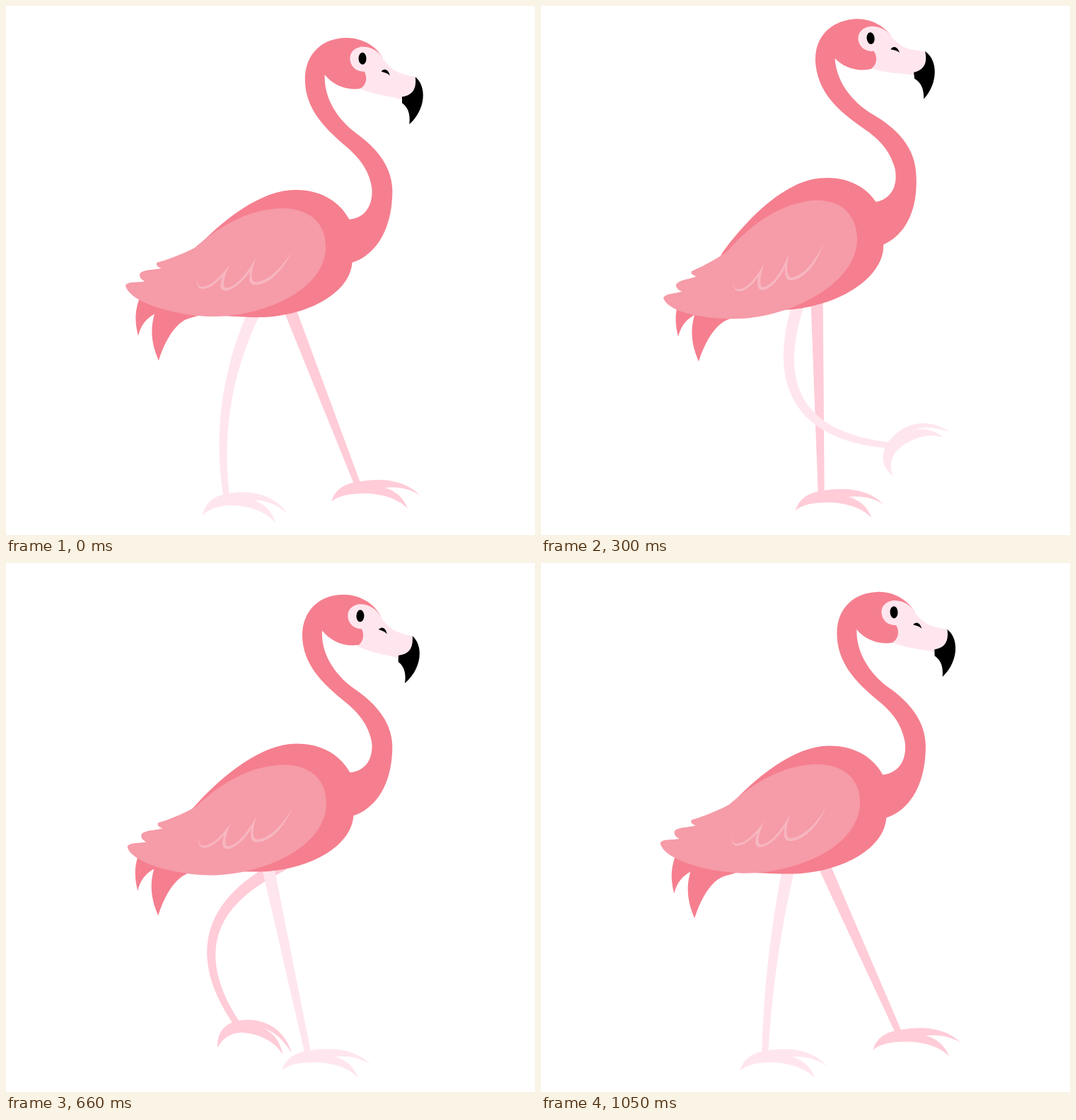
Recreate the animation shown at these times as an HTML page. Size 748x748 px, loop 1080 ms.

```html
<!DOCTYPE html>
<html lang="en">
<head>
<meta charset="utf-8">
<title>Walking flamingo</title>
<style>
  html, body { margin: 0; width: 100%; height: 100%; overflow: hidden; background: #fff; }
  svg { display: block; width: 100vw; height: 100vh; }
  .pink { fill: #f57f8f; }
  .wing { fill: #f69ba8; }
  .mark { fill: #f7b6c0; }
  .pale { fill: #ffe6ee; }
  .rose { fill: #ffccd8; }
</style>
</head>
<body>
<svg viewBox="0 0 748 748">
  <g class="rose"><path id="farLeg"/><path id="farFoot"/></g>
  <g class="pale"><path id="nearLeg"/><path id="nearFoot"/></g>
  <path id="tail" class="pink" d="M188,412 C180,434 182,450 186,466 C190,450 198,441 209,435 C202,460 206,480 215,501 C222,478 238,444 262,440 Q274,436 285,434 L285,415 Z"/>
  <path id="body" class="pink" d="M486,302 C470,272 440,260 410,260 C362,260 308,300 262,350 L222,410 L262,437 C300,436 330,441 365,440 C430,437 487,405 490,363 Z"/>
  <path id="neck" class="pink"/>
  <g id="wing">
    <path class="wing" d="M171,400 C172,393 187,395 198,393 C192,390 190,386 191,382 C196,376 210,377 221,374 C215,372 213,369 215,366 C232,361 252,353 268,344 C308,308 348,287 393,286 C434,287 453,310 453,340 C453,402 365,441 288,441 C242,440 178,424 171,400 Z"/>
    <path class="mark" d="M272,384 C271,395 274,400 280,399 C292,398 305,385 318,367 C310,385 307,398 313,400 C328,400 345,375 355,356 C348,375 347,391 355,391 C372,390 392,370 405,347 C395,371 375,395 354,395 C345,395 345,385 347,375 C338,390 323,404 312,404 C303,404 305,392 308,384 C298,396 286,403 278,402 C271,400 271,392 272,384 Z"/>
  </g>
  <g id="head">
    <path class="pale" d="M534,74 C527,62 514,57 503,58 C493,60 487,67 488,76 C489,87 498,93 508,93 C513,102 510,113 502,117 C520,126 543,128 562,133 C577,127 582,118 580,101 C560,97 548,95 534,74 Z"/>
    <path d="M580,101 C597,115 594,148 571,168 C573,153 569,144 561,138 L561,129 C576,127 582,118 580,101 Z"/>
    <ellipse cx="505.500" cy="74.500" rx="5.500" ry="8.500"/>
    <path d="M532,93 C536,88 542,90 544,99 C540,95 537,95 532,93 Z"/>
  </g>
</svg>
<script>
const LOOP = 1080, HALF = LOOP / 2, STEP = 30;
const NECK = "M440,345 L486,302 C510,300 520,280 518,258 C514,232 500,215 484,201 " +
  "C455,176 424,148 424,104 C424,68 448,45 483,45 C508,45 527,60 534,74 L540,95 L520,118 L502,117 " +
  "C482,120 463,111 452,97 C450,135 475,165 497,181 C530,205 548,233 547,265 C546,315 525,352 490,363 L440,380 Z";

const cycle = (t, peak, period) => Math.cos(2 * Math.PI * (t - peak) / period);
const smooth = s => s * s * (3 - 2 * s);
const clamp = v => Math.min(1, Math.max(0, v));

function turn(x, y, deg) {
  const r = deg * Math.PI / 180, c = Math.cos(r), s = Math.sin(r);
  return [x * c - y * s, x * s + y * c];
}

const mover = (cx, cy, dx, dy, deg) => (x, y) => {
  const [px, py] = turn(x - cx, y - cy, deg);
  return [px + cx + dx, py + cy + dy];
};

const el = id => document.getElementById(id);
const setPath = (id, d) => el(id).setAttribute("d", d);
const place = (id, cx, cy, dx, dy, deg) =>
  el(id).setAttribute("transform", `translate(${dx} ${dy}) rotate(${deg} ${cx} ${cy})`);
const fmt = p => p.map(v => v.toFixed(2)).join();

// The torso bobs once per step; each part trails the one it hangs from.
const bob = (t, mean, size, peak) => mean + size * cycle(t, peak, HALF);
const bodyRise = t => bob(t, -7.3, 7.5, 22);

function drawTorso(t) {
  const body = [390, 350, bob(t, -3, 4.5, 85), bodyRise(t), bob(t, -3, 3.3, 45)];
  const head = [505, 74, bob(t, -19, 21, 50), bob(t, -13, 17, 62), bob(t, -2.7, 4.5, 90)];
  const sway = bob(t, -1.5, 1.8, 135);
  place("body", ...body);
  place("head", ...head);
  place("wing", 312, 370, sway, sway, bob(t, -2.6, 3.9, 30));
  place("tail", 0, 0, bob(t, 4, 4.5, 340), bob(t, .6, 3, 400), 0);

  // The neck bends from the body's pose at its base to the head's pose at the top.
  const low = mover(...body), high = mover(...head);
  setPath("neck", NECK.replace(/(\d+),(\d+)/g, (_, x, y) => {
    const w = smooth(clamp((300 - y) / 250));
    const p = low(+x, +y), q = high(+x, +y);
    return fmt(p.map((v, i) => v + (q[i] - v) * w));
  }));
}

// One gait for both legs: the foot slides back at walking speed, then swings forward.
function gait(p) {
  const speed = .296;
  const swing = 1 / (1 + Math.exp((228 - p) / 43));
  const fold = Math.max(0, cycle(p, 228, LOOP));
  const lift = p < 570 ? 71 * Math.sin(Math.PI * (p / 570) ** 1.1) : 0;
  return {
    hip: [361 + 13 * cycle(p, 560, LOOP), 440 + .8 * bodyRise(p)],
    ankle: [
      310 + speed * (LOOP * swing - p) + 12 * Math.min(0, Math.sin(2 * Math.PI * p / LOOP)),
      692 - lift
    ],
    bend: 101 * fold,
    curl: 23 * fold,
    tilt: 3 - 46 * Math.exp(-(((p - 320) / 95) ** 2))
  };
}

function legShape({ hip: [hx, hy], ankle: [ax, ay], bend }) {
  const dx = ax - hx, dy = ay - hy, reach = Math.hypot(dx, dy);
  const knee = s => [hx + dx * s - dy / reach * bend, hy + dy * s + dx / reach * bend];
  const [x1, y1] = knee(.33), [x2, y2] = knee(.67);
  const mix = (a, b, c, d, s, u) => a * u ** 3 + 3 * b * u * u * s + 3 * c * u * s * s + d * s ** 3;
  const rate = (a, b, c, d, s, u) => (b - a) * u * u + 2 * (c - b) * u * s + (d - c) * s * s;
  const left = [], right = [], parts = 28;
  for (let i = -1; i <= parts; i++) {
    const s = Math.max(0, i / parts), u = 1 - s, w = 8.5 - 4 * s;
    let tx = rate(hx, x1, x2, ax, s, u), ty = rate(hy, y1, y2, ay, s, u);
    const len = Math.hypot(tx, ty), tuck = i < 0 ? 14 : 0;
    tx /= len;
    ty /= len;
    const x = mix(hx, x1, x2, ax, s, u) - tx * tuck;
    const y = mix(hy, y1, y2, ay, s, u) - ty * tuck;
    left.push(fmt([x - ty * w, y + tx * w]));
    right.unshift(fmt([x + ty * w, y - tx * w]));
  }
  return "M" + left.concat(right).join(" ") + "Z";
}

function footShape({ ankle: [ax, ay], tilt, curl }) {
  const at = (x, y, k) => {
    const [px, py] = turn(x, y, tilt + curl * k);
    return fmt([px + ax, py + ay]);
  };
  return `M${at(-35, 27, -1)} C${at(-30, 8, -.7)} ${at(-15, 0, -.3)} ${at(3, -3, 0)}
    C${at(30, -9, 0)} ${at(65, -10, .4)} ${at(89, 12, 1)}
    C${at(74, 4, .9)} ${at(58, 1, .5)} ${at(39, 4, .2)}
    C${at(56, 8, .25)} ${at(67, 18, .4)} ${at(73, 32, .45)}
    C${at(55, 15, .3)} ${at(25, 12, .1)} ${at(5, 14, 0)}
    C${at(-10, 15, -.3)} ${at(-25, 18, -.8)} ${at(-35, 27, -1)}Z`;
}

function drawLeg(name, phase, hipShift, footShift, rise) {
  const pose = gait(phase % LOOP);
  pose.hip = [pose.hip[0] + hipShift, pose.hip[1] - rise];
  pose.ankle = [pose.ankle[0] + footShift, pose.ankle[1] - rise];
  setPath(name + "Leg", legShape(pose));
  setPath(name + "Foot", footShape(pose));
}

function frame() {
  const t = Math.floor((performance.now() + 1) / STEP) * STEP % LOOP;
  drawTorso(t);
  drawLeg("far", t + HALF, 30, 27, 4);
  drawLeg("near", t, 0, 0, 0);
  requestAnimationFrame(frame);
}
frame();
</script>
</body>
</html>
```
